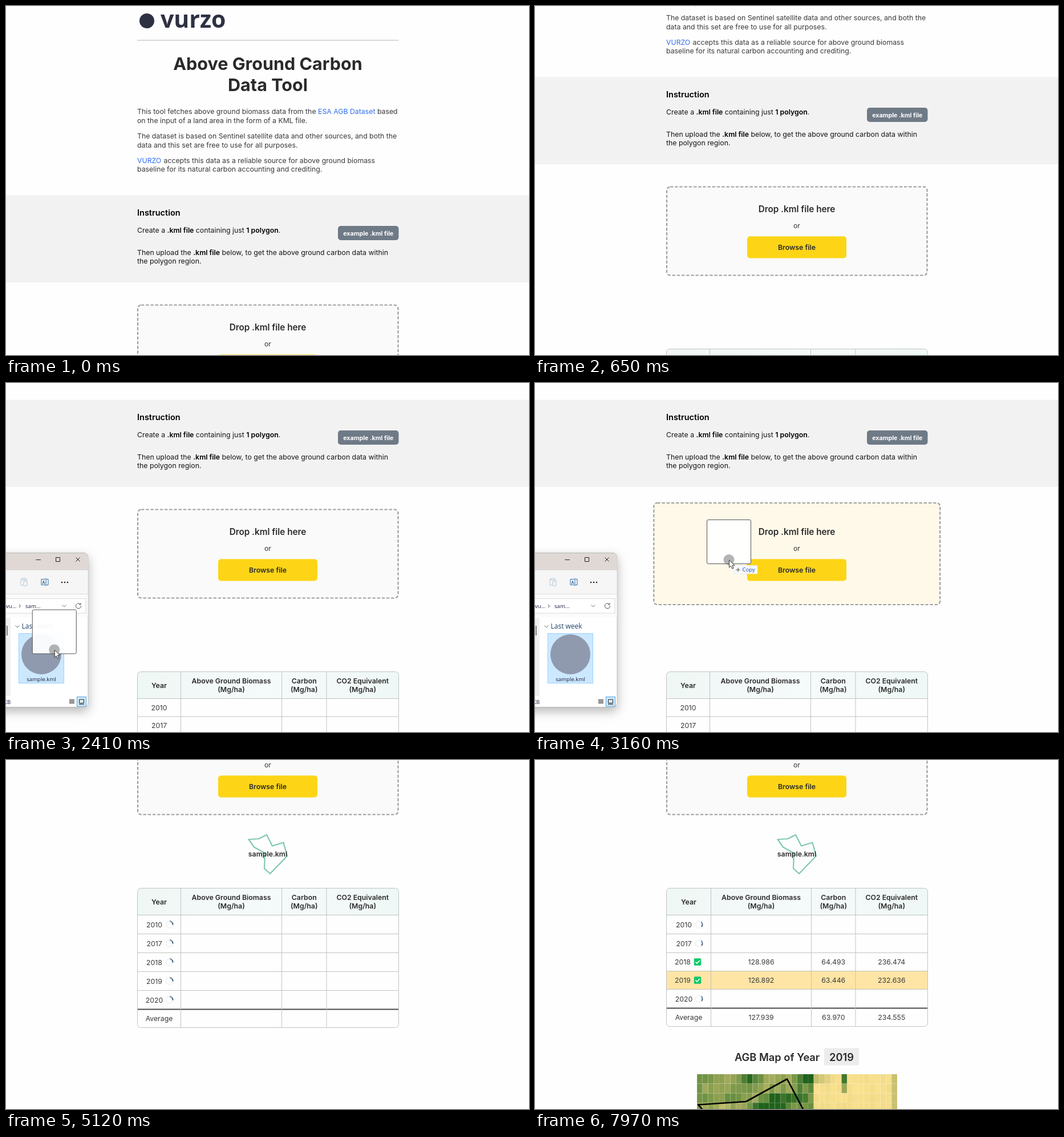
Recreate the animation shown at these times as an HTML page. Size 917 px wide and 611 px high, loop 8 s.

```html
<!DOCTYPE html>
<html lang="en">
<head>
<meta charset="utf-8">
<title>Above Ground Carbon Data Tool</title>
<style>
  html, body { margin: 0; width: 100%; height: 100%; overflow: hidden; background: #fefefe; }
  svg { display: block; width: 917px; height: 611px; }
  text { font: 400 12.3px Inter, sans-serif; font-optical-sizing: none; fill: #3a3a3a; }
  .mid { text-anchor: middle; }
  .semi { font-weight: 600; fill: #2a2a2a; }
  .dark { fill: #161616; }
  .dark tspan { font-weight: 600; fill: #000; }
  .link { fill: #2f6fed; }
  .h1 { font-size: 30.56px; font-weight: 700; }
  .h2 { font-size: 18.3px; }
  .h3 { font-size: 15.28px; }
  .h4 { font-size: 14.5px; fill: #000; }
  .small { font-size: 10.7px; font-weight: 700; fill: #fff; }
  .brand { font: 700 41px "Open Sans", sans-serif; fill: #2d3142; }
  .win { font: 400 12px "Open Sans", sans-serif; fill: #1d3f66; }
  .tiny { font: 400 9.6px "Open Sans", sans-serif; fill: #1b1b3a; }
  .line { fill: none; stroke: #c0c3c3; }
</style>
</head>
<body>
<svg viewBox="0 0 917 611"></svg>
<script>
const LOOP = 8000;
const svg = document.querySelector('svg');

const RESULTS = {
  2018: { at: 6200, values: [128.986, 64.493, 236.474] },
  2019: { at: 7200, values: [126.892, 63.446, 232.636] },
};
const AVERAGE = { 2018: [128.986, 64.493, 236.474], 2019: [127.939, 63.97, 234.555] };
const DROP_AT = 3600;

const clamp = v => Math.max(0, Math.min(1, v));
const linear = (t, from, to) => clamp((t - from) / (to - from));
const ease = (t, from, to) => { const k = linear(t, from, to); return k * k * (3 - 2 * k); };
const mix = (a, b, k) => a + (b - a) * k;

const text = (x, y, content, cls = '') => `<text x="${x}" y="${y}" class="${cls}">${content}</text>`;
const rect = (x, y, w, h, fill, more = '') =>
  `<rect x="${x}" y="${y}" width="${w}" height="${h}" fill="${fill}" ${more}/>`;
const path = (d, stroke, width = 1, more = '') =>
  `<path d="${d}" fill="none" stroke="${stroke}" stroke-width="${width}" ${more}/>`;
const move = (x, y, content, more = '') => `<g transform="translate(${x} ${y})" ${more}>${content}</g>`;

// Whole pixels, as a browser scrolls.
const scrollAt = t => Math.round(
  207 * linear(t, 70, 650) + 61 * linear(t, 650, 860) +
  34 * linear(t, 960, 1120) + 281 * ease(t, 4685, 5120));

function intro() {
  return `<circle cx="247" cy="26" r="13" fill="#2d3142"/>` +
    text(271, 38, 'vurzo', 'brand') +
    rect(230, 59, 458.5, 2, '#d8d8d8') +
    text(459, 111.5, 'Above Ground Carbon', 'semi mid h1') +
    text(459, 149.3, 'Data Tool', 'semi mid h1') +
    text(230, 189.3, 'This tool fetches above ground biomass data from the <tspan class="link">ESA AGB Dataset</tspan> based') +
    text(230, 204.6, 'on the input of a land area in the form of a KML file.') +
    text(230, 232.2, 'The dataset is based on Sentinel satellite data and other sources, and both the') +
    text(230, 247.5, 'data and this set are free to use for all purposes.') +
    text(230, 275, 'VURZO', 'link') +
    text(276.5, 275, 'accepts this data as a reliable source for above ground biomass') +
    text(230, 290.3, 'baseline for its natural carbon accounting and crediting.');
}

function instruction() {
  return rect(0, 331.5, 917, 152.5, '#f3f2f2') +
    text(230, 366.7, 'Instruction', 'semi h4') +
    text(230, 397.4, 'Create a <tspan>.kml file</tspan> containing just <tspan>1 polygon</tspan>.', 'dark') +
    rect(582, 385, 106.5, 25, '#6f7a87', 'rx="5"') +
    text(635.3, 401.7, 'example .kml file', 'mid small') +
    text(230, 435.5, 'Then upload the <tspan>.kml file</tspan> below, to get the above ground carbon data within', 'dark') +
    text(230, 450.8, 'the polygon region.', 'dark');
}

function dropZone(t) {
  const k = ease(t, 2900, 3150) * (1 - ease(t, 3520, 3720));
  const growX = 22.7 * k, growY = 11.5 * k;
  const fill = `rgb(${mix(249, 255, k)},${mix(249.5, 249, k)},${mix(249, 233, k)})`;
  return rect(231 - growX, 523.5 - growY, 456.5 + 2 * growX, 155 + 2 * growY, fill,
      'rx="6" stroke="#9f9f9f" stroke-width="2.2" stroke-dasharray="5.4 2.8"') +
    text(459, 568, 'Drop .kml file here', 'semi mid h3') +
    text(459, 595.7, 'or', 'mid') +
    rect(372, 610.3, 174, 38.2, '#fdd516', 'rx="5"') +
    text(459, 634, 'Browse file', 'semi mid');
}

function sampleShape() {
  return path('M425.5 722L443 721L457 714L467 733.5L486.5 727.5L493 751L463 782L453 773L454 746L435 735.5Z',
      '#80c7b3', 2.2, 'stroke-linejoin="round"') +
    text(459, 752.3, 'sample.kml', 'semi mid');
}

function spinner(x, y, t) {
  const angle = (t - 4760) / 1360 * 360 - 180;
  return move(x, y, `<circle r="6" fill="none" stroke="#eeeff1" stroke-width="1.6"/>
    <g transform="rotate(${angle})">` +
    path('M6 0A6 6 0 0 1 4.24 4.24', '#6c849d', 2) +
    path('M4.24 4.24A6 6 0 0 1 0 6', '#3d5a7a', 2) + '</g>');
}

const checkMark = (x, y) => move(x, y,
  rect(-6.2, -6.2, 12.4, 12.4, '#12c76a', 'rx="1.5"') + path('M-3.5 0L-1 2.6L3.8 -2.6', '#fff', 1.5));

function table(t) {
  const started = t >= DROP_AT;
  const current = t >= RESULTS[2019].at ? 2019 : t >= RESULTS[2018].at ? 2018 : 0;
  const cols = current ? [230.5, 308.5, 484.5, 562, 688.5] : [230.5, 306.5, 483.5, 562, 688.5];
  const centers = [0, 1, 2, 3].map(i => (cols[i] + cols[i + 1]) / 2);
  const top = 807.5, headEnd = 854.5;
  const values = (list, y) =>
    list.map((v, i) => text(centers[i + 1], y, v.toFixed(3), 'mid')).join('');
  const separator = (y, stroke = '#c0c3c3', width = 1) => path(`M230.5 ${y}H688.5`, stroke, width);

  let fills = '', lines = separator(headEnd), words = '', y = headEnd;
  for (const year of [2010, 2017, 2018, 2019, 2020]) {
    const result = RESULTS[year], done = result && t >= result.at;
    const height = done ? 32 : started ? 33 : 31.5;
    const mid = y + height / 2, base = mid + 4.5;
    if (year === current) fills += rect(230.5, y, 458, height, '#ffe5a5');
    words += text(centers[0] - (done ? 10.5 : started ? 8.5 : 0), base, year, 'mid');
    if (done) words += checkMark(centers[0] + 15.5, mid) + values(result.values, base);
    else if (started) words += spinner(centers[0] + 18, mid, t);
    y += height;
    lines += year === 2020 ? separator(y, '#4a4a4a', 1.8) : separator(y);
  }
  const end = y + 32;
  words += text(centers[0], y + 20.7, 'Average', 'mid');
  if (current) words += values(AVERAGE[current], y + 20.7);

  const heads = ['Above Ground Biomass', 'Carbon', 'CO2 Equivalent'];
  words += text(centers[0], 835.8, 'Year', 'semi mid') + heads.map((h, i) =>
    text(centers[i + 1], 828, h, 'semi mid') + text(centers[i + 1], 843.3, '(Mg/ha)', 'semi mid')).join('');
  for (const x of cols.slice(1, 4)) lines += path(`M${x} ${top}V${end}`, '#c0c3c3');

  return rect(230.5, top, 458, end - top, '#fefefe', 'rx="6"') +
    `<path d="M230.5 ${headEnd}V${top + 6}q0 -6 6 -6H682.5q6 0 6 6V${headEnd}Z" fill="url(#head)"/>` +
    fills + lines +
    `<rect class="line" x="230.5" y="${top}" width="458" height="${end - top}" rx="6"/>` + words +
    (current ? biomassMap(current, end) : '');
}

const noise = (x, y) => { const n = Math.sin(x * 127.1 + y * 311.7) * 43758.5453; return n - Math.floor(n); };

// Dense spots on the forested side: column, row, strength.
const WOODS = [[0, 0, .45], [9, 0, .7], [20, 0, .5], [14, 2, .55], [17, 2, .4], [11, 3, .7], [14, 3, .6], [0, 2, .4], [6, 2, .3]];

function density(col, row, year) {
  if (col === 26 && row < 2) return row ? .4 : year === 2019 ? .85 : .6;
  if (col === 35) return .2;
  if (col > 20) return col < 24 && row === 0 ? .22 - .06 * (col - 21) : .04 * noise(col, row);
  const woods = WOODS.reduce((sum, [c, r, s]) => sum + s * Math.exp(-((col - c) ** 2) / 4 - (row - r) ** 2 * 1.5), 0);
  return clamp(.3 + woods + .3 * (noise(col, row) - .35) + (col > 16 ? .2 : 0));
}

function mapColor(d) {
  const stops = [[250, 225, 142], [166, 172, 92], [110, 146, 66], [32, 98, 28]];
  const i = Math.min(2, Math.floor(d * 3)), k = d * 3 - i;
  return `rgb(${stops[i].map((c, j) => Math.round(mix(c, stops[i + 1][j], k)))})`;
}

function biomassMap(year, tableEnd) {
  const top = tableEnd + 83.5, w = 351 / 36, h = 16.7;
  let cells = '';
  for (let row = 0; row < 4; row++)
    for (let col = 0; col < 36; col++)
      cells += rect(284 + col * w, top + row * h, w, h, mapColor(density(col, row, year)),
        'stroke="#fff" stroke-opacity=".13" stroke-width=".7"');
  return text(350, tableEnd + 60, 'AGB Map of Year', 'semi h2') +
    rect(507, tableEnd + 38, 61, 30, '#ececec', 'rx="1"') +
    text(537.5, tableEnd + 60, year, 'semi mid h2') + cells +
    move(0, top, path('M310 80L286 53.5L370 48L442 8.5L482 84', '#000', 2.6, 'stroke-linejoin="round"'));
}

function explorer(t) {
  const opacity = linear(t, 1010, 1140) * (1 - linear(t, 3620, 3780));
  if (!opacity) return '';
  const active = t >= 1370, picked = t >= 1800;
  const icon = active ? '#222' : '#777';
  return `<g opacity="${opacity}">` +
    rect(-40, 297.5, 184, 270, '#fff', 'rx="7" stroke="#b8b8b8" filter="url(#shadow)"') +
    `<path d="M0 328V298H137q6.5 0 6.5 6.5V328Z" fill="${active ? '#dfd8d4' : '#e7e5e5'}"/>` +
    rect(0, 328, 143.5, 41, '#f6f6f6') + rect(0, 369, 143.5, 41, '#fbfbfb') +
    path('M0 327.5H143M0 369.5H143', '#dedede') +
    path('M52.5 309.5H61M87.5 305.5h7v7h-7ZM122.5 305.5l7 7m0 -7l-7 7', icon) +
    path('M28 343.5h-2v10.5h4M34 343.5h2v3M28 342h6v3h-6ZM31 347h6v8h-6Z', '#b3c6d8') +
    path('M69 343.5h-7v10h7M71 343.5h3v10h-3M70 341.5v14M64 352l2 -6l2 6M65 350h2.5', '#2f6ea8') +
    [98, 103, 108].map(x => `<circle cx="${x}" cy="349" r="1.3" fill="#222"/>`).join('') +
    rect(-5, 377.5, 145, 25.5, '#fff', 'stroke="#d9d9d9"') +
    text(0, 393.5, 'vu...', 'tiny') + text(34, 393.5, 'sam...', 'tiny') +
    path('M23 388l2.5 2.5l-2.5 2.5', '#333') +
    path('M98.5 388.5l3.5 3.5l3.5 -3.5', '#777') +
    path('M130.5 387.5a4.5 4.5 0 1 0 1 2.5M131 385v3h-3', '#555') +
    rect(0, 411, 8, 137, '#f0f0f0') + rect(1, 425, 2, 17, '#858585') +
    path('M16.5 424.5l3.5 3.5l3.5 -3.5', '#666') + text(27.5, 430, 'Last week', 'win') +
    rect(22.5, 438.5, 79, 87, picked ? '#cce8ff' : '#d9d9d9', picked ? 'stroke="#99d1ff"' : '') +
    '<circle cx="62" cy="475" r="35" fill="#8f9aae"/>' +
    text(62, 521.5, 'sample.kml', 'tiny mid') +
    text(-4, 561.5, 'KB', 'tiny') +
    path('M111 554.5h9M111 556.5h9M111 558.5h9M111 560.5h9', '#333') +
    rect(124.5, 549.5, 16, 16.5, '#d3eafb', 'stroke="#4ba3e0"') +
    path('M128.5 554h8v6.5h-8ZM128 562.5h9', '#222') + '</g>';
}

function pointer(t) {
  if (t < 1570 || t > 4300) return '';
  const arrive = ease(t, 1570, 1860), drag = ease(t, 2320, 3110), leave = ease(t, 3720, 4300);
  const x = mix(mix(mix(130, 75, arrive), 340, drag), 905, leave);
  const y = mix(mix(mix(382, 473, arrive), 309.5, drag), 400, leave);
  const dragging = t >= 2320 && t < 3520;
  const load = !dragging ? '' :
    rect(-38.5, -70, 77, 77, '#fff', 'fill-opacity=".95" stroke="#555" rx="2.5"') +
    '<circle r="9.5" fill="#777" fill-opacity=".55"/>' +
    (x > 150 ? rect(9, 10, 41, 14.5, '#f7fbff', 'stroke="#dfe6ee" stroke-width=".7"') +
      path('M12.5 17.5h7M16 14v7', '#444') +
      '<text x="23.5" y="20.8" class="tiny" style="fill:#1d3f9e">Copy</text>' : '');
  return move(x, y, load +
    '<path d="M.5 .5V13.5L3.5 10.7L5.8 15.5L8 14.5L5.8 9.8H9.8Z" fill="#fff" stroke="#222" stroke-width=".9"/>');
}

const DEFS = `<defs>
  <linearGradient id="head"><stop stop-color="#eff7f5"/><stop offset=".5" stop-color="#f5fafa"/><stop offset="1" stop-color="#eff8f6"/></linearGradient>
  <filter id="shadow" x="-20%" y="-20%" width="150%" height="150%"><feDropShadow dx="0" dy="7" stdDeviation="9" flood-opacity=".28"/></filter>
</defs>`;

function draw(now) {
  const t = now % LOOP;
  const page = intro() + instruction() + dropZone(t) + (t >= DROP_AT ? sampleShape() : '') + table(t);
  svg.innerHTML = DEFS + move(0, -scrollAt(t), page) + explorer(t) + pointer(t);
  requestAnimationFrame(draw);
}
requestAnimationFrame(draw);
</script>
</body>
</html>
```
